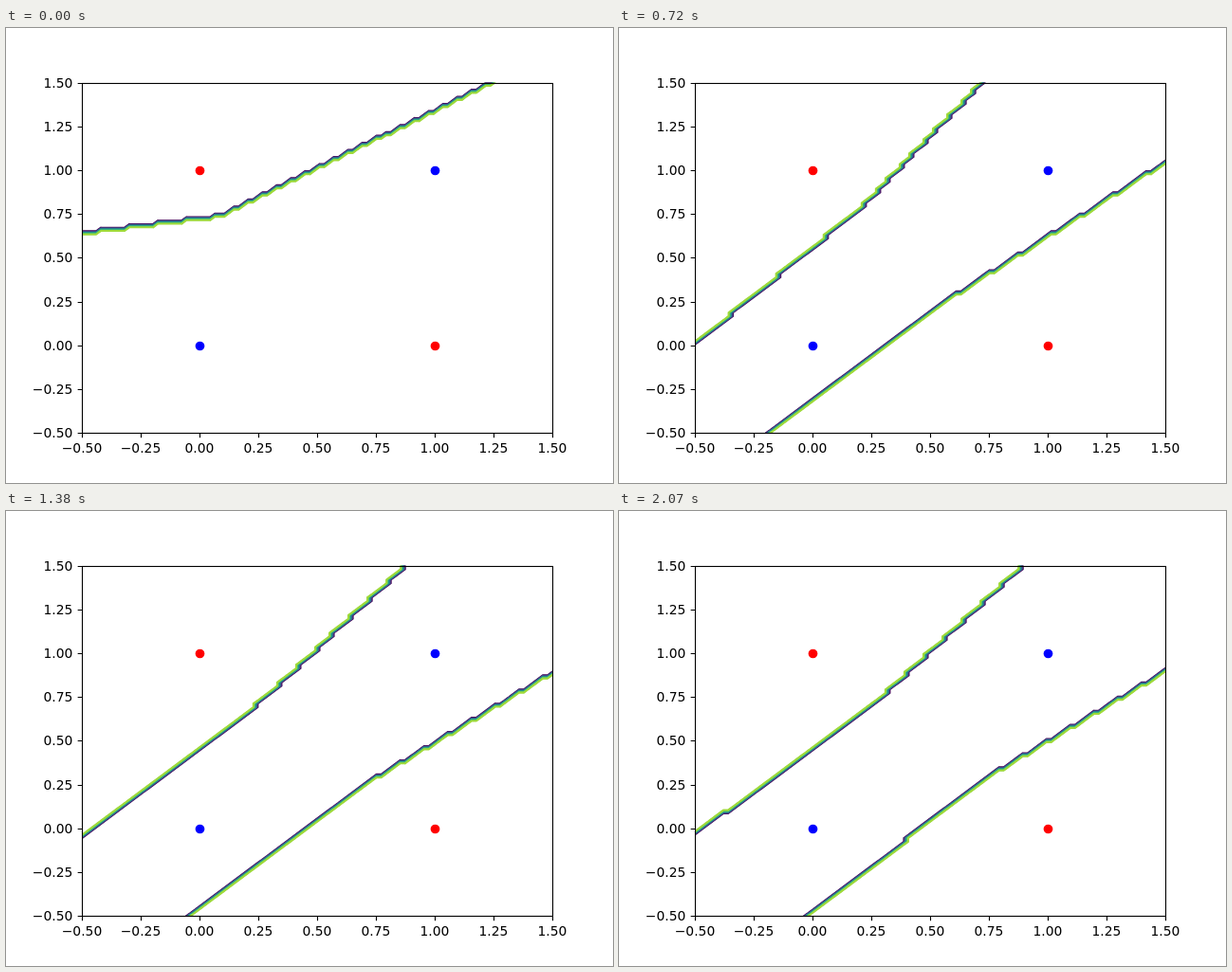
Animation of 640 by 480 pixels, one loop 2.1 s. Source, as an HTML page:

```html
<!DOCTYPE html>
<html lang="en">
<head>
<meta charset="utf-8">
<title>Decision boundary</title>
<style>
  html, body { margin: 0; width: 100%; height: 100%; overflow: hidden; background: #fff; }
  svg { display: block; width: 640px; height: 480px; }
  text { font: 13.89px "DejaVu Sans", sans-serif; fill: #000; }
  .axis { fill: none; stroke: #000; stroke-width: 1.11; }
  .contour { fill: none; stroke-width: 2.083; stroke-linejoin: round; stroke-linecap: round; }
</style>
</head>
<body>
<svg id="plot" viewBox="0 0 640 480">
  <clipPath id="area"><rect x="80" y="57.6" width="496" height="369.6"/></clipPath>
</svg>
<script>
const STEP = 30, LOOP = 2100, N = 100;
const COLORS = ['#440154', '#46327e', '#365c8d', '#277f8e', '#1fa187', '#4ac16d', '#a0da39'];

// Shape of the inner region over the steps:
// [step, upper ray angle, upper kink x y, upper base x y, lower base x y, lower kink x y, lower ray slope]
const KEYS = [
  [0, 189.54, -.3, .6736, .086, .738, .086, .738, .6, 1.0768, .658],
  [8, 94.64, .1468, .7, .184, .239, .184, .239, .64, .412, .68],
  [24, 54.17, .2, .78, -2, -1.64, -2, -2.294, .6, .28, .8486],
  [33, 51.59, .286, .7103, -2, -1.61, -2, -2.324, .6, .224, .807],
  [41, 52.38, .24, .74, -2, -1.568, -2, -2.4345, .723, .234, .777],
  [51, 51.12, .3, .73, -2, -1.572, -2, -2.467, .72, .294, .826],
  [69, 51.34, .294, .752, -2, -1.519, -2, -2.5127, .762, .3045, .804]
];

const svg = document.getElementById('plot');
const px = x => 204 + 248 * x;
const py = y => 334.8 - 184.8 * y;
const snap = v => Math.floor(v + .5) + .5;
const node = i => -.5 + 2 * i / (N - 1);

function add(tag, attrs, text) {
  const el = document.createElementNS('http://www.w3.org/2000/svg', tag);
  for (const k in attrs) el.setAttribute(k, attrs[k]);
  if (text) el.textContent = text;
  svg.appendChild(el);
  return el;
}

const layer = add('g', { 'clip-path': 'url(#area)' });
const paths = COLORS.map(stroke => layer.appendChild(add('path', { class: 'contour', stroke })));

for (const [x, y, fill] of [[0, 0, '#00f'], [1, 1, '#00f'], [0, 1, '#f00'], [1, 0, '#f00']]) {
  add('circle', { cx: snap(px(x)), cy: snap(py(y)), r: 4.86, fill });
}

add('rect', { class: 'axis', x: 80.5, y: 58.5, width: 496, height: 369 });
for (let i = 0; i <= 8; i++) {
  const v = -.5 + i / 4;
  const label = v.toFixed(2).replace('-', '\u2212');
  const x = px(v), y = py(v);
  add('path', { class: 'axis', d: `M${snap(x)} 427.5v4.86M80.5 ${snap(y)}h-4.86` });
  add('text', { x, y: 448, 'text-anchor': 'middle' }, label);
  add('text', { x: 70.3, y: Math.round(y + 5.06), 'text-anchor': 'end' }, label);
}

function regionAt(step) {
  let k = 0;
  while (k < KEYS.length - 2 && step >= KEYS[k + 1][0]) k++;
  const a = KEYS[k], b = KEYS[k + 1];
  const t = (step - a[0]) / (b[0] - a[0]);
  const [, deg, ux, uy, ax, ay, bx, by, lx, ly, slope] = a.map((v, i) => v + (b[i] - v) * t);
  const rad = deg * Math.PI / 180;
  return [
    [ux + 20 * Math.cos(rad), uy + 20 * Math.sin(rad)],
    [ux, uy], [ax, ay], [bx, by], [lx, ly],
    [20, ly + slope * (20 - lx)], [20, 20]
  ];
}

function inside(poly, x, y) {
  let hit = false;
  poly.forEach(([x1, y1], i) => {
    const [x2, y2] = poly[(i + 1) % poly.length];
    if ((y1 > y) !== (y2 > y) && x < x1 + (x2 - x1) * (y - y1) / (y2 - y1)) hit = !hit;
  });
  return hit;
}

// Cell sides whose two corners differ, each as [zero corner, one corner].
function findCells(poly) {
  const grid = [];
  for (let j = 0; j < N; j++) {
    for (let i = 0; i < N; i++) grid.push(inside(poly, node(i), node(j)) ? 0 : 1);
  }
  const cells = [];
  for (let j = 0; j < N - 1; j++) {
    for (let i = 0; i < N - 1; i++) {
      const corners = [[i, j], [i + 1, j], [i + 1, j + 1], [i, j + 1]];
      const z = corners.map(([c, r]) => grid[r * N + c]);
      const sides = [];
      for (let s = 0; s < 4; s++) {
        const e = (s + 1) % 4;
        if (z[s] !== z[e]) sides.push(z[s] ? [corners[e], corners[s]] : [corners[s], corners[e]]);
      }
      if (sides.length) cells.push(sides);
    }
  }
  return cells;
}

function draw(step) {
  const cells = findCells(regionAt(step));
  paths.forEach((path, n) => {
    const level = .15 * n;
    const point = ([p, q]) =>
      px(node(p[0] + (q[0] - p[0]) * level)).toFixed(2) + ' ' +
      py(node(p[1] + (q[1] - p[1]) * level)).toFixed(2);
    let d = '';
    for (const sides of cells) {
      for (let s = 0; s < sides.length; s += 2) d += `M${point(sides[s])}L${point(sides[s + 1])}`;
    }
    path.setAttribute('d', d);
  });
}

const start = performance.now();
let shown = -1;
function tick() {
  const step = Math.floor((performance.now() - start) % LOOP / STEP);
  if (step !== shown) draw(shown = step);
  requestAnimationFrame(tick);
}
tick();
</script>
</body>
</html>
```
